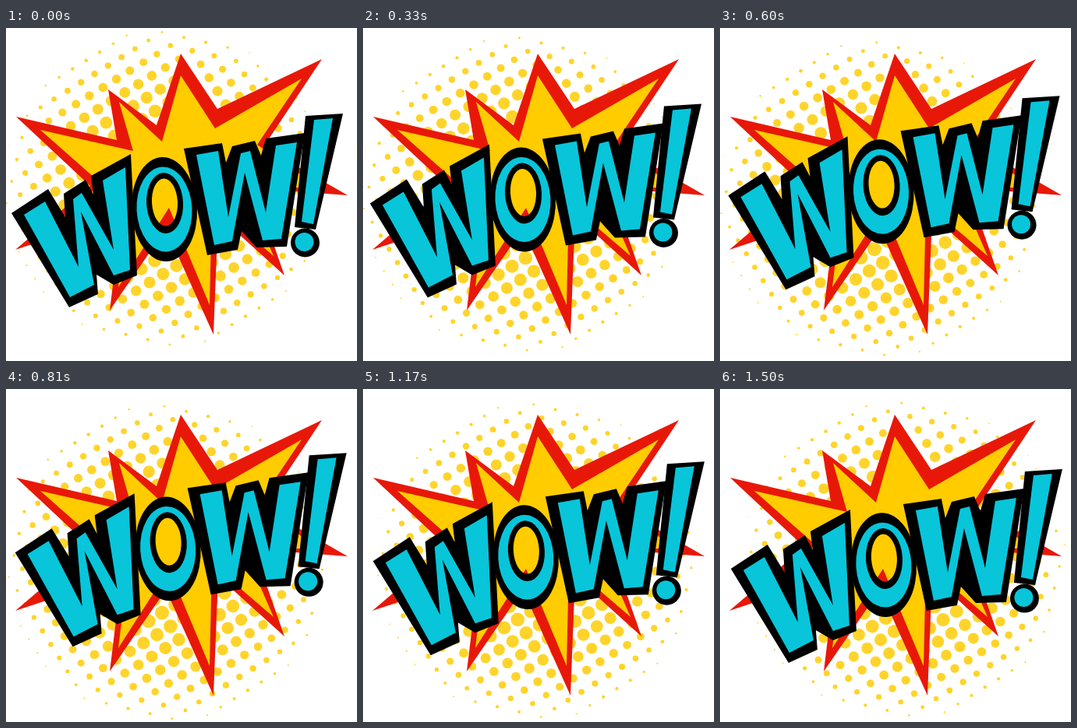
Write an HTML page that moves like this. It is 450x428 px and loops after 1.53 s.

```html
<!DOCTYPE html>
<html lang="en">
<head>
<meta charset="utf-8">
<title>Wow</title>
<style>
html, body { margin: 0; width: 100%; height: 100%; overflow: hidden; background: #fff; }
svg { display: block; width: 450px; height: 428px; }
</style>
</head>
<body>
<svg viewBox="0 0 450 428" role="img" aria-label="WOW!">
  <g id="dots" fill="#ffd42a"></g>

  <g id="burst">
    <polygon fill="#e81809" points="13,114 142,144 131,79 193,125 224,33 271,104 405,40 330,153 438,215 318,206
      357,318 272,241 266,394 205,258 133,363 148,240 12,285 108,203"/>
    <polygon fill="#fc0" points="44,131 163,158 145,95 200,146 224,61 268,129 379,65 322,150 400,204 306,208
      343,293 264,225 261,356 209,231 144,333 156,235 50,264 122,200"/>
  </g>

  <g id="word">
    <g fill="#000">
      <polygon points="7,238 54,207 76,243 74,213 102,195 112,214 109,190 160,162 168,318 138,330 116,317 118,342 81,359"/>
      <polygon points="228,155 277,148 282,173 290,152 319,145 327,164 333,142 383,135 360,281 321,282 302,261 297,285 258,292"/>
      <polygon points="384,113 432,110 397,259 370,256"/>
      <circle cx="383.5" cy="276" r="18.5"/>
    </g>
    <g transform="rotate(-3 203 233)" fill-rule="evenodd">
      <path id="ring"/>
      <path id="bowl" fill="#08c5da"/>
    </g>
    <g fill="#08c5da">
      <polygon points="23,240 50,223 93,307 86,220 97,212 138,285 124,196 153,179 159,311 138,318 96,236 113,330 82,346"/>
      <polygon points="244,163 272,158 285,243 301,161 313,158 333,237 346,151 373,147 353,271 329,273 306,186 290,274 267,279"/>
      <polygon points="395,118 419,116 394,252 379,249"/>
      <circle cx="382.5" cy="275" r="12"/>
    </g>
  </g>
</svg>
<script>
const LOOP = 1530, STEP = 30;
const $ = id => document.getElementById(id);

const ellipse = (x, y, rx, ry) =>
  `M${x - rx} ${y}a${rx} ${ry} 0 1 0 ${2 * rx} 0a${rx} ${ry} 0 1 0 ${-2 * rx} 0z`;
$('ring').setAttribute('d', ellipse(203, 233, 42, 67) + ellipse(204, 224, 16.5, 30.5));
$('bowl').setAttribute('d', ellipse(203, 233, 35.5, 54.5) + ellipse(204, 225, 23.5, 39));

// Halftone disc: a tilted square lattice whose dots shrink towards the rim
function halftone(cx, cy, rim, size) {
  const u = 17.3, v = 10.75, x0 = 200, y0 = 5.3;
  let svg = '';
  for (let i = -20; i <= 20; i++) {
    for (let j = -2; j <= 20; j++) {
      const x = x0 + i * u + j * v, y = y0 - i * v + j * u;
      const r = size * (1 - (Math.hypot(x - cx, y - cy) / rim) ** 3);
      if (r > 0.4) svg += `<circle cx="${x.toFixed(1)}" cy="${y.toFixed(1)}" r="${r.toFixed(2)}"/>`;
    }
  }
  return svg;
}
$('dots').innerHTML = halftone(204, 206, 212, 9.3);

const paths = {
  word: [[0, 0], [4.5, -29], [7, -6]],
  dots: [[0, 0], [1, 17], [34, 12.5]]
};

// Straight drift between evenly spaced stops
function place(id, p) {
  const stops = paths[id], s = p * (stops.length - 1), k = Math.floor(s);
  const [x, y] = stops[k].map((a, i) => a + (stops[k + 1][i] - a) * (s - k));
  $(id).setAttribute('transform', `translate(${x.toFixed(2)} ${y.toFixed(2)})`);
}

const start = performance.now();
function draw(now) {
  const t = Math.max(0, now - start) % LOOP;
  const p = Math.floor(t / STEP) * STEP / LOOP;
  for (const id in paths) place(id, p);
  requestAnimationFrame(draw);
}
draw(start);
</script>
</body>
</html>
```
